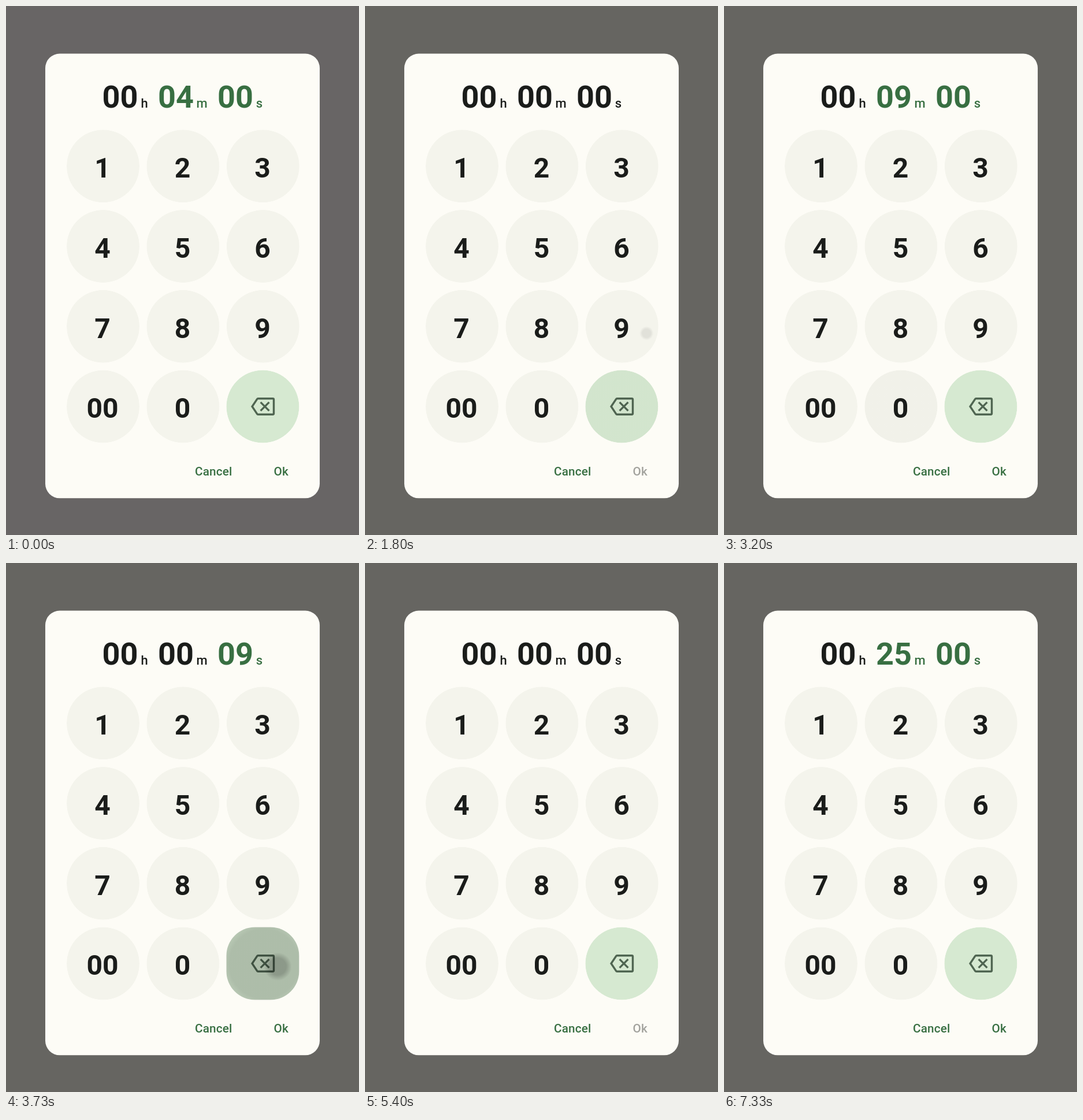
Write an HTML page that moves like this. It is 611 px wide and 916 px high and loops after 8000 ms.

```html
<!DOCTYPE html>
<html lang="en">
<head>
<meta charset="utf-8">
<title>Timer keypad</title>
<style>
  html, body { margin: 0; width: 100%; height: 100%; overflow: hidden; background: #666561; }
  svg { display: block; width: 100vw; height: 100vh; }
  text { font-family: Roboto, Arial, sans-serif; text-anchor: middle; fill: #1a1c1a; }
  .time { font-size: 54px; font-weight: 700; }
  .unit { font-size: 22px; font-weight: 500; }
  .key { font-size: 48px; font-weight: 700; }
  .action { font-size: 20.7px; font-weight: 500; letter-spacing: .15px; fill: #386f42; }
</style>
</head>
<body>
<svg id="stage" viewBox="0 0 611 916">
  <defs>
    <radialGradient id="soft">
      <stop offset=".6" stop-color="#000"/>
      <stop offset=".8" stop-color="#000" stop-opacity=".5"/>
      <stop offset="1" stop-color="#000" stop-opacity="0"/>
    </radialGradient>
  </defs>
  <rect id="back" width="611" height="916" fill="#666561"/>
  <rect x="68" y="82.5" width="475" height="769.8" rx="25" fill="#fdfcf6"/>
</svg>
<script>
const LOOP = 8000, SIZE = 126, TAP = 85, ENTER = 450, EXIT = 375;
const GREEN = '#386f42', DARK = '#1a1c1a', GREY = '#a2a29d';
const stage = document.getElementById('stage');
const back = document.getElementById('back');

// [time, key, touch offset x, touch offset y]
const taps = [
  [455, 'del', 30, 6], [730, 'del', 32, 6], [1010, 'del', 32, 8],
  [1770, '9', 43, 12], [2170, '0', 32, 14], [2400, '0', 32, 14],
  [3430, 'del', 30, 6], [3640, 'del', 30, 6], [3840, 'del', 30, 6],
  [5480, '2', 34, 12], [5960, '5', 34, 12], [6510, '00', 34, 12]
];

function add(parent, tag, attrs, content) {
  const el = document.createElementNS('http://www.w3.org/2000/svg', tag);
  for (const name in attrs) el.setAttribute(name, attrs[name]);
  if (content) el.textContent = content;
  parent.append(el);
  return el;
}

const label = (kind, x, y, content) => add(stage, 'text', { class: kind, x, y }, content);

const fields = [['h', 197.5, 239.5], ['m', 294, 339], ['s', 397, 438.5]].map(([unit, x, ux]) => ({
  digits: label('time', x, 176, '00'),
  unit: label('unit', ux, 176, unit)
}));
label('action', 359.2, 813, 'Cancel');
const ok = label('action', 476.3, 813, 'Ok');

function drawIcon(parent) {
  add(parent, 'path', {
    d: 'M22 4H7.1Q6.5 4 6.2 4.5L1.2 12 6.2 19.5Q6.5 20 7.1 20H22Q23 20 23 19V5Q23 4 22 4ZM9.7 7.7l8.6 8.6m0-8.6l-8.6 8.6',
    transform: 'translate(424 672.9) scale(1.717)',
    fill: 'none', stroke: '#4f6551', 'stroke-width': 2
  });
}

const keys = {};
['1', '2', '3', '4', '5', '6', '7', '8', '9', '00', '0', 'del'].forEach((name, i) => {
  const col = i % 3, row = Math.floor(i / 3), del = name === 'del';
  const cx = 168 + col * 138.4 - (del ? .4 : 0), cy = 277.3 + row * 138.75;
  const box = { x: cx - SIZE / 2, y: cy - SIZE / 2, width: SIZE, height: SIZE };
  const clip = add(add(stage, 'clipPath', { id: 'clip' + name }), 'rect', box);
  const g = add(stage, 'g', { 'clip-path': `url(#clip${name})` });
  const face = add(g, 'rect', { ...box, fill: del ? '#d6e9d1' : '#f4f4ec' });
  if (del) drawIcon(g);
  else add(g, 'text', { class: 'key', x: 167 + col * 138.5, y: 297 + row * 138.75 }, name);
  keys[name] = { cx, cy, g, shapes: [clip, face] };
});

const ripples = taps.map(([, name]) => add(keys[name].g, 'circle', { fill: 'url(#soft)' }));

const clamp = v => Math.max(0, Math.min(1, v));
const smooth = v => (v = clamp(v), v * v * (3 - 2 * v));

// cubic-bezier(.4, 0, .2, 1)
function ease(x) {
  let lo = 0, hi = 1, s = .5;
  for (let i = 0; i < 20; i++) {
    s = (lo + hi) / 2;
    const bx = 1.2 * s * (1 - s) ** 2 + .6 * s * s * (1 - s) + s ** 3;
    if (bx < x) lo = s; else hi = s;
  }
  return 3 * s * s * (1 - s) + s ** 3;
}

function entered(t) {
  let value = '400';
  for (const [start, key] of taps) {
    if (t >= start + TAP) value = key === 'del' ? value.slice(0, -1) : value + key;
  }
  return value;
}

function drawTime(t) {
  const value = entered(t), padded = value.padStart(6, '0');
  fields.forEach(({ digits, unit }, i) => {
    digits.textContent = padded.slice(i * 2, i * 2 + 2);
    digits.style.fill = unit.style.fill = value.length > 4 - i * 2 ? GREEN : DARK;
  });
  ok.style.fill = value ? GREEN : GREY;
}

function drawKeys(t) {
  const press = {};
  taps.forEach(([start, name, dx, dy], i) => {
    const age = t - start, { cx, cy } = keys[name], dot = ripples[i];
    const live = age > 0 && age < ENTER + EXIT;
    const p = ease(clamp(age / ENTER));
    const alpha = live ? .19 * clamp(age / 75) * (1 - clamp((age - ENTER) / EXIT)) : 0;
    dot.setAttribute('cx', cx + dx * (1 - p));
    dot.setAttribute('cy', cy + dy * (1 - p));
    dot.setAttribute('r', 11 + 97 * p);
    dot.setAttribute('opacity', alpha);
    const bend = smooth((age - 20) / 100) * (1 - smooth((age - 150) / 140));
    press[name] = Math.max(press[name] || 0, bend);
  });
  for (const name in press) {
    const r = SIZE / 2 - 17 * press[name];
    keys[name].shapes.forEach(s => s.setAttribute('rx', r));
  }
}

for (const name in keys) keys[name].shapes.forEach(s => s.setAttribute('rx', SIZE / 2));

function frame() {
  const t = performance.now() % LOOP;
  const warm = 1 - clamp(t / 470);
  back.setAttribute('fill', `rgb(${102 + 2 * warm},101,${97 + 4 * warm})`);
  drawTime(t);
  drawKeys(t);
  requestAnimationFrame(frame);
}
frame();
</script>
</body>
</html>
```
